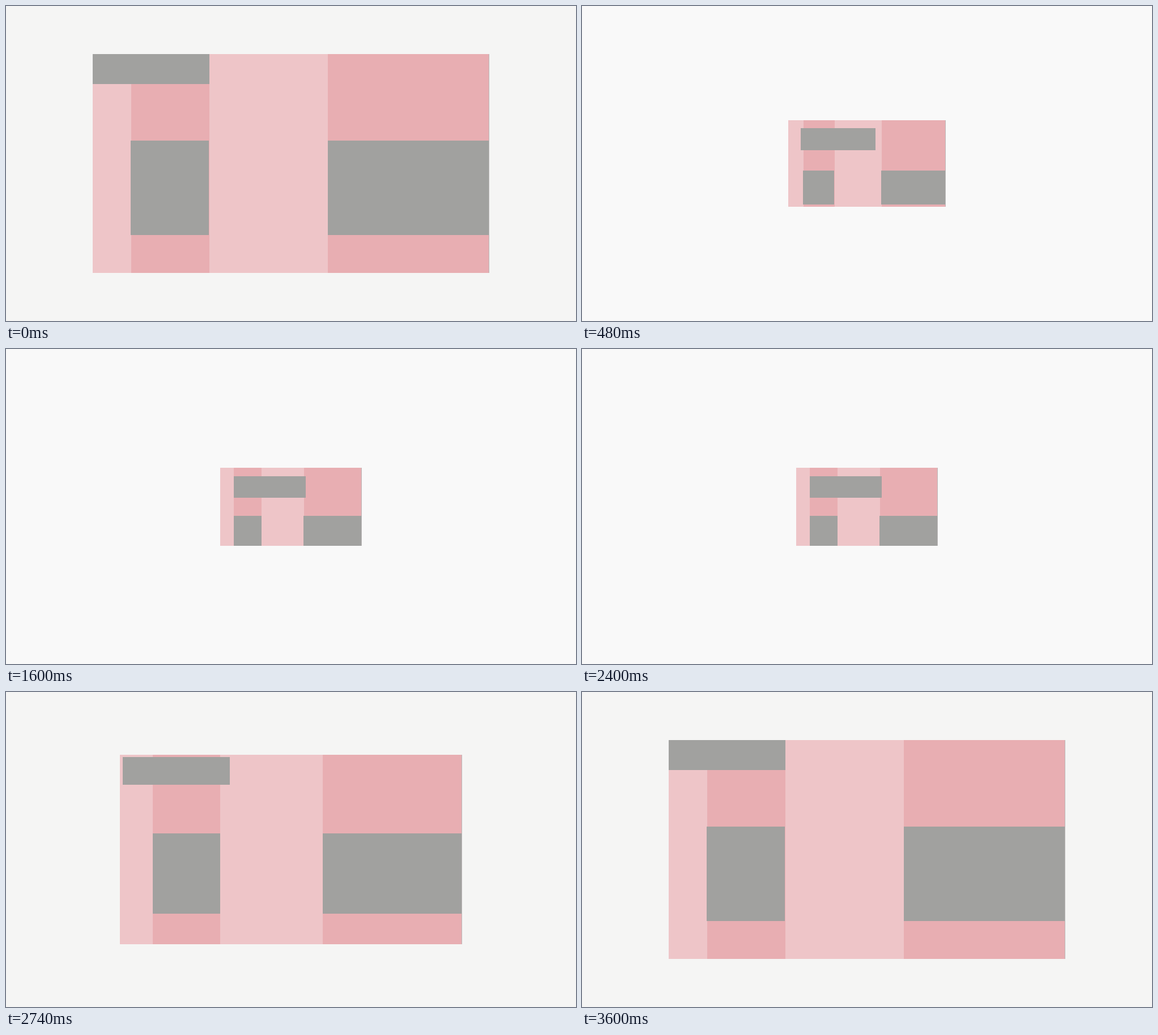
An HTML page with a canvas for the animation above (4460 ms loop, 1006 by 557 pixels).

```html
<!DOCTYPE html>
<html lang="en">
<head>
<meta charset="utf-8">
<title>Layout resize</title>
<style>
  html, body { margin: 0; width: 100%; height: 100%; overflow: hidden; background: #f5f5f4; }
  canvas { display: block; }
</style>
</head>
<body>
<canvas id="stage" width="1006" height="557"></canvas>
<script>
const ctx = document.getElementById('stage').getContext('2d');
const LOOP = 4460, STEP = 20;
const LIGHT = '#eec5c8', DARK = '#e8aeb2', GREY = '#a1a19f', EDGE = '#bcb9b9';
const CX = 502.5, CY = 278.5;
const columns = [0, 0.097, 0.2945, 0.594, 1];   // column edges as shares of the panel width

const curve = (a, b, s) => 3 * a * s * (1 - s) ** 2 + 3 * b * s * s * (1 - s) + s ** 3;

// Same shape as the CSS "ease" timing function
function ease(x) {
  if (x <= 0) return 0;
  if (x >= 1) return 1;
  let lo = 0, hi = 1;
  for (let i = 0; i < 24; i++) {
    const mid = (lo + hi) / 2;
    if (curve(0.25, 0.25, mid) < x) lo = mid; else hi = mid;
  }
  return curve(0.1, 1, lo);
}

// Fills between edges snapped to whole pixels
function fill(colour, left, top, right, bottom, snap = Math.round) {
  const x = snap(left), y = Math.round(top);
  ctx.fillStyle = colour;
  ctx.fillRect(x, y, snap(right) - x, Math.round(bottom) - y);
}

function draw(t) {
  const shrink = ease((t - 242) / 344) - ease((t - 2563) / 364);
  const mix = (large, small) => large + (small - large) * shrink;

  const w = mix(699, 249), h = mix(387, 138);
  const left = CX - w / 2, right = left + w;
  const top = CY - h / 2, bottom = top + h;
  const blockBottom = bottom - mix(67.5, 0);
  const blockTop = blockBottom - mix(166.5, 52.5);
  const barX = left + mix(0, 24), barY = top + mix(0, 15.5);

  fill(shrink > 0.75 ? '#f9f9f9' : '#f5f5f4', 0, 0, 1006, 557);
  fill(EDGE, left, top, right + 0.6, bottom);

  for (let i = 0; i < 4; i++) {
    const odd = i % 2;
    const [x1, x2] = [columns[i], columns[i + 1]].map(share => left + w * share);
    fill(odd ? DARK : LIGHT, x1, top, x2, bottom);
    if (odd) fill(GREY, x1, blockTop, x2, blockBottom, Math.floor);
  }
  fill(GREY, barX, barY, barX + mix(206, 127), barY + mix(53, 37.5));
}

const start = performance.now();
function tick() {
  const t = (performance.now() - start) % LOOP;
  draw(Math.floor(t / STEP) * STEP);
  requestAnimationFrame(tick);
}
tick();
</script>
</body>
</html>
```
